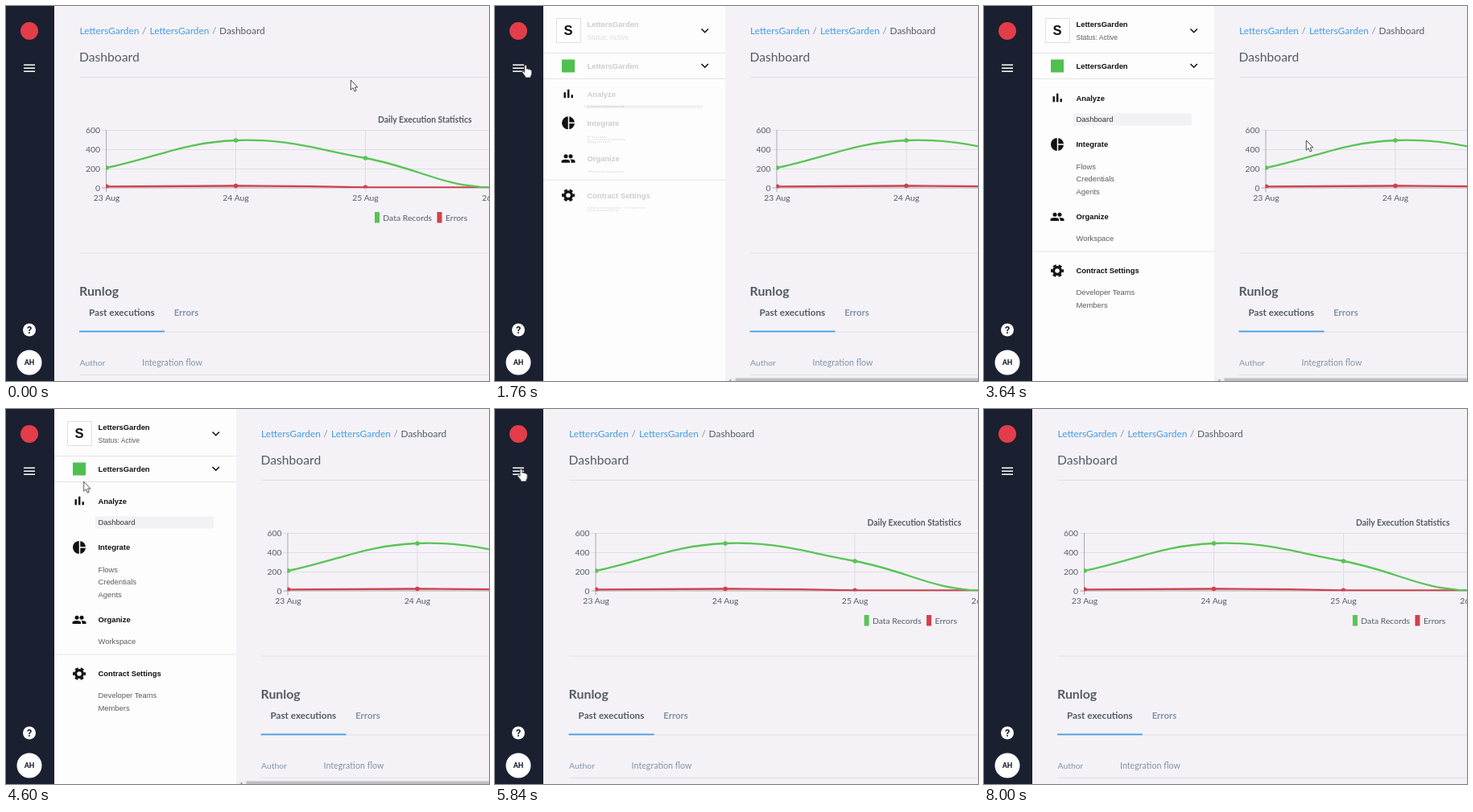
An HTML page for the animation above (8040 ms loop, 600 px wide and 466 px high).

```html
<!DOCTYPE html>
<html lang="en">
<head>
<meta charset="utf-8">
<title>Dashboard menu</title>
<style>
  @property --open { syntax: "<number>"; inherits: true; initial-value: 0; }

  html, body { margin: 0; width: 100%; height: 100%; overflow: hidden; background: #f4f2f7; }
  svg { display: block; width: 600px; height: 466px; }
  svg * { animation: 8040ms infinite linear; }

  /* Page content */
  .page { font: 10.4px Lato, "Open Sans", sans-serif; fill: #555b66; animation-name: slide; animation-timing-function: ease; }
  .page .bold, .tab { font-weight: 700; }
  .crumb { font-size: 11.9px; }
  .link { fill: #459be3; }
  .title { font-size: 15.7px; }
  .runlog { font-size: 15.9px; }
  .muted { fill: #8293a9; }
  .mid { text-anchor: middle; }
  .end { text-anchor: end; }
  .rule { stroke: #e2e0e6; }
  .grid { stroke: #dfdde3; }
  .axis { stroke: #aaa9b0; }
  .line { fill: none; stroke-width: 2.3; }
  .green { stroke: #5ac455; }
  .red { stroke: #d0404b; }
  .scroll { animation-name: scrollbar; animation-timing-function: step-end; }

  /* Menu panel */
  .panel { font: 9.4px "Liberation Sans", Arial, sans-serif; fill: #111; animation-name: panel, expand; animation-timing-function: linear, ease; }
  .panel .name { font-weight: 700; }
  .panel .sub { fill: #5c5c5f; }
  .panel .current { fill: #333; }
  .fade { animation-name: fade; }
  .edge { stroke: #e3e3e6; }
  .chevron { fill: none; stroke: #111; stroke-width: 1.6; }
  .row, .item { --y: calc((var(--a) + (var(--b) - var(--a)) * var(--open)) * 1px); transform: translateY(var(--y)); }
  .item { transform: translateY(var(--y)) scaleY(calc(.12 + .88 * var(--open))); }

  /* Pointer */
  .pointer { stroke: #222; fill: #fff; stroke-linejoin: round; animation-name: move; animation-timing-function: ease-in-out; }
  .arrow { animation-name: arrow; animation-timing-function: step-end; }
  .hand { animation-name: hand; animation-timing-function: step-end; }

  @keyframes slide {
    0%, 18.16% { transform: translateX(0); }
    21.89%, 67.79% { transform: translateX(225.5px); }
    73.01%, 100% { transform: translateX(0); }
  }
  @keyframes scrollbar {
    0% { opacity: 0; }
    18.3% { opacity: 1; }
    72%, 100% { opacity: 0; }
  }
  @keyframes panel {
    0%, 19% { opacity: 0; }
    21.9%, 67.5% { opacity: 1; }
    70%, 100% { opacity: 0; }
  }
  @keyframes expand {
    0%, 21% { --open: 0; }
    26.9% { --open: 1; }
    66.04% { --open: 1; animation-timing-function: linear; }
    67.16%, 100% { --open: 0; }
  }
  @keyframes fade {
    0%, 21.5% { opacity: 0; }
    23.5%, 66.04% { opacity: 1; }
    67.16% { opacity: .15; }
    67.6%, 100% { opacity: 0; }
  }
  @keyframes move {
    0%, .4% { transform: translate(428px, 92px); }
    10%, 28.6% { transform: translate(38px, 73px); }
    38.8%, 49.9% { transform: translate(400px, 167px); }
    60.2%, 76.4% { transform: translate(32.5px, 74px); }
    86.6%, 100% { transform: translate(612px, 150px); }
  }
  @keyframes arrow {
    0% { opacity: 1; }
    9.3% { opacity: 0; }
    29.3% { opacity: 1; }
    59.4% { opacity: 0; }
    77.2%, 100% { opacity: 1; }
  }
  @keyframes hand {
    0% { opacity: 0; }
    9.3% { opacity: 1; }
    29.3% { opacity: 0; }
    59.4% { opacity: 1; }
    77.2%, 100% { opacity: 0; }
  }
</style>
</head>
<body>
<svg viewBox="0 0 600 466">
  <clipPath id="plot"><path d="M124 150H900V226.3H124Z"/></clipPath>
  <rect width="600" height="466" fill="#f4f2f7"/>

  <g class="panel">
    <rect x="60" width="226" height="466" fill="#fefdfe"/>
    <path class="edge" d="M60 58.5H286M60 90.5H286"/>
    <rect x="76.5" y="15.5" width="30" height="30" fill="#fff" stroke="#dedee2"/>
    <text class="name mid" x="91" y="36.3" font-size="16.5">S</text>
    <rect x="83" y="66.5" width="16" height="16" fill="#4fc04f"/>
    <path class="chevron" d="M256.5 28.5l4.2 4.2 4.2-4.2M256.5 72l4.2 4.2 4.2-4.2"/>
    <g class="fade">
      <text class="name" x="114.5" y="26">LettersGarden</text>
      <text class="sub" x="114.5" y="41.5" font-size="8.5">Status: Active</text>
      <text class="name" x="114.5" y="77.5">LettersGarden</text>
    </g>

    <g class="row" style="--a:108;--b:114.2">
      <path d="M85.5-2h2.4v7h-2.4zM90-5.5h2.4v10.5h-2.4zM94.5 1h2.4v4h-2.4z"/>
      <text class="name fade" x="114.5" y="3.4">Analyze</text>
    </g>
    <g class="item" style="--a:121.5;--b:141">
      <rect x="111" y="-7.5" width="147" height="15" fill="#f2f1f3"/>
      <text class="sub current fade" x="114.5" y="3.4">Dashboard</text>
    </g>

    <g class="row" style="--a:139;--b:172">
      <circle cx="91" r="8"/>
      <path d="M91.5-9V9M91.5 0H100" stroke="#fff" stroke-width="1.5"/>
      <text class="name fade" x="114.5" y="3.4">Integrate</text>
    </g>
    <g class="item" style="--a:154;--b:199.5"><text class="sub fade" x="114.5" y="3.4">Flows</text></g>
    <g class="item" style="--a:154.3;--b:215"><text class="sub fade" x="114.5" y="3.4">Credentials</text></g>
    <g class="item" style="--a:154.6;--b:231"><text class="sub fade" x="114.5" y="3.4">Agents</text></g>

    <g class="row" style="--a:172.5;--b:262">
      <circle cx="88" cy="-2.8" r="2.5"/>
      <circle cx="94" cy="-2.8" r="2.5"/>
      <path d="M82.5 5V3C82.5 .3 93 .3 93 3V5ZM94.5 5V3Q94.5 1.7 93.2 1C96 .6 99.5 1.4 99.5 3V5Z"/>
      <text class="name fade" x="114.5" y="3.4">Organize</text>
    </g>
    <g class="item" style="--a:186;--b:289"><text class="sub fade" x="114.5" y="3.4">Workspace</text></g>
    <g class="row" style="--a:195;--b:305"><path class="edge" d="M60 0H286"/></g>

    <g class="row" style="--a:213;--b:329">
      <g fill="none" stroke="#111">
        <circle cx="91" r="4.4" stroke-width="3.2"/>
        <circle cx="91" r="6.8" stroke-width="2.4" stroke-dasharray="4 3.12" stroke-dashoffset="2"/>
      </g>
      <text class="name fade" x="114.5" y="3.4">Contract Settings</text>
    </g>
    <g class="item" style="--a:226;--b:355.7"><text class="sub fade" x="114.5" y="3.4">Developer Teams</text></g>
    <g class="item" style="--a:226.5;--b:371.5"><text class="sub fade" x="114.5" y="3.4">Members</text></g>
  </g>

  <g class="page">
    <rect x="60" width="840" height="466" fill="#f4f2f7"/>
    <g class="crumb">
      <text class="link" x="91.5" y="34.8">LettersGarden</text>
      <text x="169" y="34.8" class="muted">/</text>
      <text class="link" x="178.5" y="34.8">LettersGarden</text>
      <text x="256" y="34.8" class="muted">/</text>
      <text x="265" y="34.8">Dashboard</text>
    </g>
    <text class="title" x="91" y="68.5">Dashboard</text>
    <path class="rule" d="M91.5 88.5H900M91.5 307H900M91.5 405H900M91.5 458.5H900"/>

    <text class="bold mid" x="520.3" y="145">Daily Execution Statistics</text>
    <path class="grid" d="M119 154.5H900M119 178.5H900M119 202.5H900M285.5 154V231M446.5 154V231"/>
    <path class="axis" d="M124.5 154V231M119 226H900"/>
    <g class="end">
      <text x="117" y="158">600</text>
      <text x="117" y="182">400</text>
      <text x="117" y="206">200</text>
      <text x="117" y="229.5">0</text>
    </g>
    <g class="mid">
      <text x="125" y="242">23 Aug</text>
      <text x="285.5" y="242">24 Aug</text>
      <text x="446.5" y="242">25 Aug</text>
      <text x="607.5" y="242">26 Aug</text>
    </g>
    <g clip-path="url(#plot)">
      <path class="line red" d="M125 224.4Q205 223.6 285.5 223.5T446.5 225.4H900"/>
      <g fill="#d0404b">
        <circle cx="125" cy="224.4" r="2.8"/>
        <circle cx="285.5" cy="223.5" r="2.8"/>
        <circle cx="446.5" cy="225.2" r="2.8"/>
      </g>
      <path class="line green" d="M125 201C189 187.4 221.5 169.4 285.5 167S382 177.3 446.5 189S543 225.5 607 225.5"/>
      <g fill="#5ac455">
        <circle cx="125" cy="201" r="2.8"/>
        <circle cx="285.5" cy="167" r="2.8"/>
        <circle cx="446.5" cy="189" r="2.8"/>
      </g>
    </g>
    <rect x="458" y="256" width="6" height="13.5" fill="#5ac455"/>
    <text x="468.3" y="266.5">Data Records</text>
    <rect x="535.5" y="256" width="6" height="13.5" fill="#d0404b"/>
    <text x="546" y="266.5">Errors</text>

    <text class="runlog bold" x="91" y="360">Runlog</text>
    <text class="tab" x="103" y="385" font-size="11.7">Past executions</text>
    <text class="tab muted" x="208.7" y="385" font-size="11.4">Errors</text>
    <rect x="91" y="403.5" width="106" height="1.8" fill="#4a9fe2"/>
    <text class="muted" x="91.5" y="447">Author</text>
    <text class="muted" x="169" y="447" font-size="10.7">Integration flow</text>

    <g class="scroll">
      <rect x="60" y="461.5" width="840" height="5" fill="#efeef1"/>
      <path d="M65 465.5l3-2v3z" fill="#999"/>
      <rect x="73" y="462.5" width="827" height="4" fill="#bfbec2"/>
    </g>
  </g>

  <rect width="60" height="466" fill="#1a2030"/>
  <circle cx="29" cy="31" r="11" fill="#e33d49"/>
  <path d="M22 73.2H36M22 77.2H36M22 81.2H36" stroke="#fff" stroke-width="1.6"/>
  <g fill="#fff">
    <circle cx="29" cy="402.5" r="8"/>
    <circle cx="29" cy="443" r="15.5"/>
  </g>
  <g class="mid" fill="#1a2030" font-family="Roboto, sans-serif" font-weight="700">
    <text x="29" y="407" font-size="12.5">?</text>
    <text x="29" y="446.3" font-size="9.2">AH</text>
  </g>

  <g class="pointer">
    <path class="arrow" stroke-width=".8" d="M.3 0V12.2L3.1 9.7 5 14 7.1 13 5.2 9H8.8Z"/>
    <path class="hand" stroke-width=".8" d="M-1.4 1.2Q0-.8 1.3 1.2V5.2Q3 4.3 3.7 5.7 5.3 4.9 5.9 6.4 7.6 6 7.8 8V11Q7.5 13 6.5 14V16H-.5V14.3L-4.3 9.5Q-4.8 7.5-2.8 8L-1.4 9.3Z"/>
  </g>
</svg>
</body>
</html>
```
